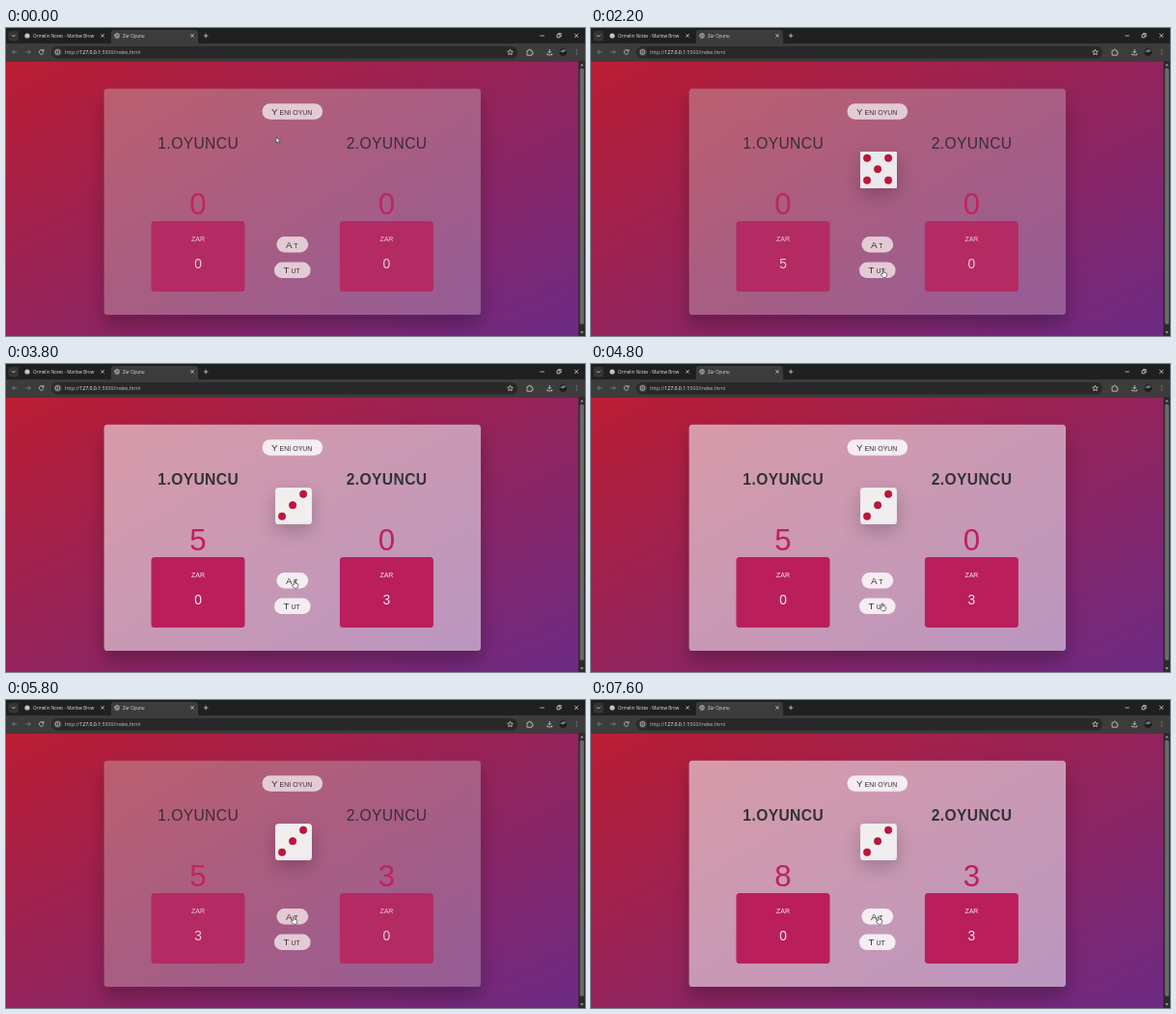
Write an HTML page that moves like this. It is 600 by 319 pixels and loops after 8000 ms.

```html
<!DOCTYPE html>
<html lang="tr">
<head>
<meta charset="utf-8">
<title>Zar Oyunu</title>
<style>
  html, body { margin: 0; width: 100%; height: 100%; overflow: hidden; background: #1f2020; }
  svg { display: block; width: 100vw; height: 100vh; }
  .ui { font-family: "Open Sans", "Noto Sans", sans-serif; fill: #e3e3e3; }
  .line { fill: none; stroke: #d0d0d0; stroke-width: .8; }
  .off { stroke: #858585; }

  #game { --text: #3a2c33; --score: #c0255f; --box: #b42b64; --boxText: #e6cbd7; --pill: #e3cbd5; --card: url(#dim); --weight: 400;
          font-family: "Liberation Sans", Arial, sans-serif; text-anchor: middle; }
  #game.bright { --text: #333; --score: #bf205c; --box: #ba1f5b; --boxText: #f8e8ef; --pill: #f5edf1; --card: url(#light); --weight: 700; }
  .card { fill: var(--card); filter: drop-shadow(0 10px 9px rgba(0,0,0,.25)); }
  .name { font-size: 15.6px; letter-spacing: .39px; font-weight: var(--weight); fill: var(--text); }
  .score { font-size: 31.2px; fill: var(--score); }
  .box { fill: var(--box); }
  .label { font-size: 7px; fill: var(--boxText); }
  .now { font-size: 13.8px; fill: var(--boxText); }
  .pill { fill: var(--pill); }
  .btn { font-size: 7px; fill: var(--text); text-anchor: start; }
  .btn .cap { font-size: 9.8px; }
  #die { filter: drop-shadow(0 7px 9px rgba(0,0,0,.22)); }
  #die circle { fill: #c5133b; stroke: #8d1530; stroke-width: .6; }
  #cursor path { fill: #fff; stroke: #222; stroke-width: .6; stroke-linejoin: round; }
</style>
</head>
<body>
<svg viewBox="0 0 600 319" preserveAspectRatio="none">
  <defs>
    <linearGradient id="page" x2="1" y2="1"><stop stop-color="#bb1d33"/><stop offset="1" stop-color="#6c2a84"/></linearGradient>
    <linearGradient id="dim" x2="1" y2="1"><stop stop-color="#bb5f70"/><stop offset="1" stop-color="#955c96"/></linearGradient>
    <linearGradient id="light" x2="1" y2="1"><stop stop-color="#d79ba9"/><stop offset="1" stop-color="#ba96bf"/></linearGradient>
  </defs>

  <!-- browser window -->
  <g class="ui">
    <rect width="600" height="17" fill="#1f2020"/>
    <rect x="2.5" y="3" width="10.5" height="10.5" rx="3" fill="#353636"/>
    <path class="line" d="M6 7.2l1.8 1.8 1.8-1.8"/>
    <circle cx="22" cy="8" r="2.6" fill="#c4c4c4"/>
    <text x="28" y="9.7" font-size="4.6">Ormelin Notes - Marlow Brow</text>
    <path d="M106 17q3 0 3-3V5q0-3 3-3h84q3 0 3 3v9q0 3 3 3z" fill="#3c3c3c"/>
    <circle cx="115" cy="8" r="2.3" class="line"/>
    <path class="line" d="M113 7l2 1 1 2M115 5.8l2 1.6"/>
    <text x="121" y="9.7" font-size="4.6">Zar Oyunu</text>
    <path class="line" d="M98.4 6.2l3.4 3.4m0-3.4l-3.4 3.4M191.4 6.2l3.4 3.4m0-3.4l-3.4 3.4M204.8 8h4.6M207.1 5.7v4.6"/>
    <path class="line" d="M553.5 8h4.4M571 6.8h3v3h-3zM572.2 6.8v-1.2h3v3h-1.2M589 5.8l4.2 4.2m0-4.2l-4.2 4.2"/>
    <rect y="16" width="600" height="18.5" fill="#3c3c3c"/>
    <rect x="47" y="19" width="483" height="12.5" rx="6.2" fill="#282828"/>
    <path class="line off" d="M11.5 25H6.7m2.2-2.2L6.7 25l2.2 2.2M20.5 25h4.8m-2.2-2.2l2.2 2.2-2.2 2.2"/>
    <path class="line" d="M38.6 23.6a2.3 2.3 0 1 0 .3 2M39 22.2v1.8h-1.8"/>
    <circle cx="53.5" cy="25" r="4.6" fill="#3c3c3c"/>
    <circle cx="53.5" cy="25" r="2.4" class="line"/>
    <path class="line" d="M53.5 24.8v1.4M53.5 23.5v.6"/>
    <text x="61" y="26.9" font-size="5.2" fill="#c2c2c2">http://<tspan fill="#fff">127.0.0.1</tspan>:5500/index.html</text>
    <path class="line" d="M522.5 22.2l.8 1.9 2 .2-1.5 1.4.4 2-1.7-1-1.7 1 .4-2-1.5-1.4 2-.2z"/>
    <path class="line" d="M540 23.4h1.5q0-1.4 1.1-1.4t1.1 1.4h1.4v1.5q1.2 0 1.2 1t-1.2 1v1.3H540z"/>
    <path class="line" d="M563.3 22v3.8m-1.7-1.6l1.7 1.7 1.7-1.7M560.8 26.3v1.5h5v-1.5"/>
    <circle cx="577.3" cy="25" r="3.7" fill="#1b1b1b"/>
    <path d="M574 24.4q3-3.6 6.6-1.2l-3 2.4z" fill="#777"/>
    <path class="line" stroke-linecap="round" d="M591.3 22.8v.01M591.3 25v.01M591.3 27.2v.01"/>
  </g>
  <rect y="34.5" width="593.5" height="284.5" fill="url(#page)"/>
  <rect x="593.5" y="34.5" width="6.5" height="284.5" fill="#2b2b2b"/>
  <rect x="594.7" y="41.5" width="4.2" height="265.5" rx="2.1" fill="#6a6a6a"/>
  <path d="M595 39.3l1.8-2.4 1.8 2.4zM595 314.3l1.8 2.4 1.8-2.4z" fill="#a0a0a0"/>

  <g id="game">
    <rect class="card" x="101.6" y="62.8" width="390.4" height="234.2" rx="3.6"/>
    <g id="players"></g>
    <g id="buttons"></g>
    <g id="die"></g>
  </g>
  <g id="cursor"></g>
</svg>
<script>
const $ = id => document.getElementById(id);
const LOOP = 8000;

$('players').innerHTML = [199, 394.4].map((x, i) => `
  <text class="name" x="${x + .2}" y="125.2">${i + 1}.OYUNCU</text>
  <text class="score" x="${x}" y="193.2"></text>
  <rect class="box" x="${x - 48.5}" y="200" width="97" height="73" rx="3.5"/>
  <text class="label" x="${x}" y="220.6">ZAR</text>
  <text class="now" x="${x}" y="248.8"></text>`).join('');

// x, y, width, first letter, rest
const pills = [[265.5, 78.2, 62.6, 'Y', 'ENI OYUN'], [280.4, 216, 32.8, 'A', 'T'], [278, 242.6, 37.6, 'T', 'UT']];
$('buttons').innerHTML = pills.map(([x, y, w, cap, rest]) => `
  <rect class="pill" x="${x}" y="${y}" width="${w}" height="16.5" rx="8.25"/>
  <text class="btn" x="${x + 9.6}" y="${y + 11.6}"><tspan class="cap">${cap}</tspan> ${rest}</text>`).join('');

const ARROW = 'M0 0v6l1.4-1.2 1 2.2 1-.5-1-2h1.9z';
const HAND = 'M-.7 4.8V.7q.7-1.2 1.4 0v2.4l2.6.7q.6.2.5 1l-.6 2.6q-.2.8-1 .8H.2q-.6 0-1-.7L-2.6 5q.6-1 1.9-.2z';

// time, scores, round points, die, bright
const states = [
  [0, [0, 0], [0, 0], 0, false],
  [700, [0, 0], [5, 0], 5, false],
  [2700, [5, 0], [0, 0], 5, true],
  [3800, [5, 0], [0, 3], 3, true],
  [5000, [5, 3], [0, 0], 3, false],
  [5700, [5, 3], [3, 0], 3, false],
  [7100, [8, 3], [0, 0], 3, true],
  [7600, [8, 3], [0, 3], 3, true]
];

// time, x, y of the pointer tip
const moves = [
  [0, 280, 113], [100, 283, 132], [200, 289, 165], [300, 295, 200], [400, 298, 221],
  [1300, 299, 225], [2200, 303, 250.3], [3300, 302, 242], [3400, 300, 231], [3500, 299, 224],
  [4500, 300, 227], [4700, 301, 238], [4800, 302, 247.5], [5300, 301, 237], [5500, 298, 224],
  [6600, 297, 233], [6700, 294, 246], [6800, 293, 252.8], [7600, 298, 224]
];

const at = (list, t) => list.filter(row => row[0] <= t).pop();
const fill = (cls, values) => document.querySelectorAll(cls).forEach((el, i) => el.textContent = values[i]);

function drawDie(n) {
  if (!n) return '';
  const dots = [[1, -1], [0, 0], [-1, 1]].concat(n === 5 ? [[-1, -1], [1, 1]] : []);
  return `<rect x="279" y="128" width="38" height="38" rx="${n === 5 ? .8 : 3.6}" fill="#ebe9ea"/>` +
    (n === 3 ? '<rect x="280" y="128.8" width="36" height="34.5" rx="3" fill="#f0eeef"/>' : '') +
    dots.map(([x, y]) => `<circle cx="${297.1 + x * 11}" cy="${146.2 + y * 11.5}" r="3.7"/>`).join('');
}

let state, move;
function frame(now) {
  const t = now % LOOP, s = at(states, t), m = at(moves, t);
  if (s !== state) {
    state = s;
    fill('.score', s[1]);
    fill('.now', s[2]);
    $('die').innerHTML = drawDie(s[3]);
    $('game').classList.toggle('bright', s[4]);
  }
  if (m !== move) {
    move = m;
    const [, x, y] = m;
    const over = pills.some(p => x > p[0] && x < p[0] + p[2] && y > p[1] && y < p[1] + 16.5);
    $('cursor').innerHTML = `<path transform="translate(${x} ${y})" d="${over ? HAND : ARROW}"/>`;
  }
  requestAnimationFrame(frame);
}
frame(0);
</script>
</body>
</html>
```
